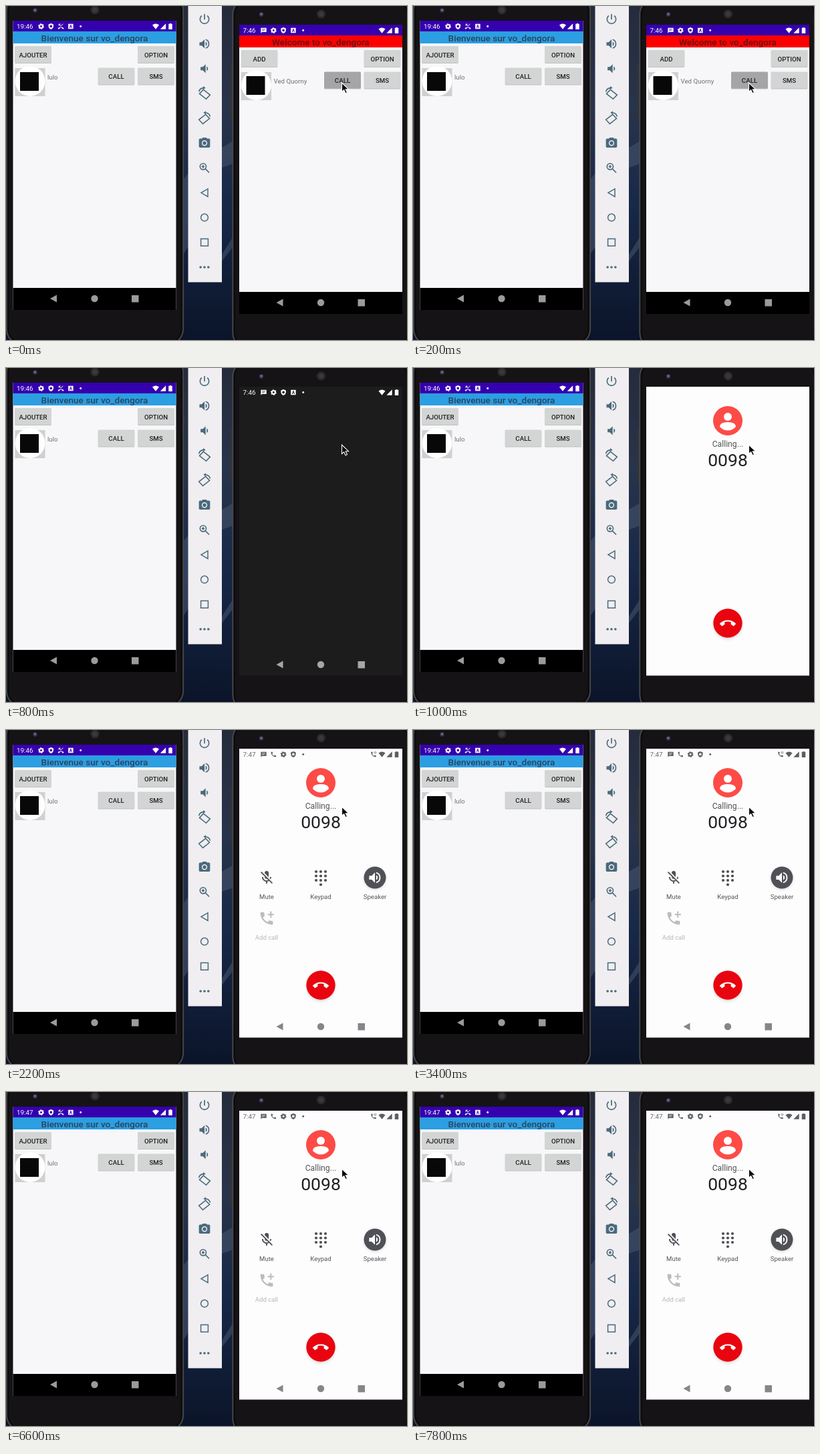
Animation of 600 by 500 pixels, one loop 8000 ms. Source, as an HTML page:

```html
<!DOCTYPE html>
<html lang="en">
<head>
<meta charset="utf-8">
<title>Two phones, one call</title>
<style>
  html, body { margin: 0; width: 100%; height: 100%; overflow: hidden; background: #10182a; }
  svg { display: block; width: 600px; height: 500px; font-family: Roboto, sans-serif; }
</style>
</head>
<body>
<svg id="stage" viewBox="0 0 600 500" xmlns="http://www.w3.org/2000/svg"></svg>
<script>
const LOOP = 8000;
const SLATE = '#4a6a7d';

// Icons live in a 24 x 24 box and take their colour from the parent.
const handset = '<path d="M6.6 10.8c1.4 2.8 3.8 5.1 6.6 6.6l2.2-2.2c.3-.3.7-.4 1-.2 1.1.4 2.3.6 3.6.6.6 0 1 .4 1 1V20c0 .6-.4 1-1 1C10.6 21 3 13.4 3 4c0-.6.4-1 1-1h3.5c.6 0 1 .4 1 1 0 1.2.2 2.4.6 3.6.1.3 0 .7-.3 1z"/>';
const stroke = (d, w = 2) => `<path d="${d}" fill="none" stroke="currentColor" stroke-width="${w}"/>`;
const turned = stroke('M10 5L22 14.5 15 22 3 12.500z', 1.9) +
  stroke('M2 9Q3 2.500 11 2', 1.9) + '<path d="M9.500-1v6l4.500-3z"/>';
const icons = {
  power: stroke('M12 3v10M17 6a8 8 0 1 1-10 0'),
  loud: '<path d="M3 9v6h4l5 5V4L7 9zM14 8v8a4.5 4.5 0 0 0 0-8z"/>' + stroke('M14 4.3a8 8 0 0 1 0 15.4'),
  soft: '<path d="M5 9v6h4l5 5V4L9 9zM16 8v8a4.5 4.5 0 0 0 0-8z"/>',
  turnLeft: turned,
  turnRight: `<g transform="matrix(-1 0 0 1 24 0)">${turned}</g>`,
  camera: '<path fill-rule="evenodd" d="M9 2L7.2 4H4a2 2 0 0 0-2 2v12a2 2 0 0 0 2 2h16a2 2 0 0 0 2-2V6a2 2 0 0 0-2-2h-3.2L15 2zM12 7a5 5 0 1 1 0 10 5 5 0 0 1 0-10z"/><circle cx="12" cy="12" r="3.2"/>',
  zoom: stroke('M9.5 4a5.5 5.5 0 1 1 0 11 5.5 5.5 0 0 1 0-11zM14 14l6.5 6.5M9.5 7v5M7 9.5h5'),
  back: stroke('M18 5v14L6 12z', 1.8),
  home: stroke('M12 5.5a6.5 6.5 0 1 1 0 13 6.5 6.5 0 0 1 0-13z', 1.8),
  recent: stroke('M5.5 5.5h13v13h-13z', 1.8),
  more: [5, 12, 19].map(x => `<circle cx="${x}" cy="12" r="2.2"/>`).join(''),
  gear: '<circle cx="12" cy="12" r="6" fill="none" stroke="currentColor" stroke-width="5"/><circle cx="12" cy="12" r="9" fill="none" stroke="currentColor" stroke-width="3" stroke-dasharray="4.71"/>',
  shield: '<path fill-rule="evenodd" d="M12 1L3 5v6c0 6 4 10 9 12 5-2 9-6 9-12V5zM12 7a4 4 0 1 1 0 9 4 4 0 0 1 0-9z"/>',
  missed: '<path d="M1 19c7-6 15-6 22 0l-3 3-4-2v-3q-4-1-8 0v3l-4 2z"/>' + stroke('M5 10V4h6M5 4l7 7 8-8', 2.4),
  letter: '<path fill-rule="evenodd" d="M3 3h18v18H3zM11 6L7 18h2l1-3h4l1 3h2L13 6zM12 9l1 4h-2z"/>',
  message: '<path fill-rule="evenodd" d="M2 3h20v15H6l-4 4zM6 7v2h12V7zM6 12v2h9v-2z"/>',
  dot: '<circle cx="12" cy="12" r="3.5"/>',
  wifi: '<path d="M0 7q12-9 24 0L12 22z"/>',
  signal: '<path d="M2 22h20V2z"/>',
  battery: '<path d="M6 4h4V2h4v2h4v18H6z"/>',
  handset,
  wifiCall: handset + stroke('M13 5q5-4 10 0M15 9q3-2 6 0', 2),
  addCall: handset + stroke('M18 2v9M13.5 6.5h9', 2),
  hangUp: '<path d="M12 9c-1.6 0-3.2.2-4.6.7v3.1c0 .4-.2.7-.6.9-1 .5-1.9 1.1-2.6 1.9-.4.4-1 .4-1.4 0L.3 13.1c-.4-.4-.4-1 0-1.4C3.3 8.8 7.5 7 12 7s8.7 1.8 11.7 4.7c.4.4.4 1 0 1.4l-2.5 2.5c-.4.4-1 .4-1.4 0-.8-.8-1.7-1.4-2.6-1.9-.4-.2-.6-.5-.6-.9V9.7C15.2 9.2 13.6 9 12 9z"/>',
  micOff: '<path d="M9 5.2V5a3 3 0 0 1 6 0v6.2zM9 10.3v.7a3 3 0 0 0 3.7 2.9z"/>' +
    stroke('M3.6 3.6l16.8 16.8', 1.8) + stroke('M5.9 11a6 6 0 0 0 9.5 5M18.1 11a6 6 0 0 1-.8 2.9M12 17v4', 1.8)
};

const icon = (name, x, y, size, color) =>
  `<g color="${color}" fill="${color}" transform="translate(${x - size / 2} ${y - size / 2}) scale(${size / 24})">${icons[name]}</g>`;
const rect = (x, y, w, h, fill, extra = '') => `<rect x="${x}" y="${y}" width="${w}" height="${h}" fill="${fill}" ${extra}/>`;
const circle = (x, y, r, fill, extra = '') => `<circle cx="${x}" cy="${y}" r="${r}" fill="${fill}" ${extra}/>`;
const text = (s, x, y, size, fill, extra = '') => `<text x="${x}" y="${y}" font-size="${size}" fill="${fill}" ${extra}>${s}</text>`;
const centered = (s, x, y, size, fill, weight = 400) =>
  text(s, x, y, size, fill, `text-anchor="middle" font-weight="${weight}"`);
const group = (id, content) => `<g id="${id}">${content}</g>`;
const band = (y, h, fill) => rect(10.5, y, 244, h, fill);

function phone() {
  return rect(.8, -18, 264.4, 526, '#151315', 'rx="25" stroke="#48494c" stroke-width="1.8"') +
    rect(3.5, -15, 259, 520, 'none', 'rx="22" stroke="#0d0c0d" stroke-width="2"') +
    circle(133, 6, 6.5, '#2c2b2d') + circle(133, 6, 3.5, '#3b393c') +
    circle(43.5, 6.5, 3.2, '#3a3650') + circle(43.5, 6, 1.5, '#7874a0');
}

function status(names, color, left, calling) {
  const right = [['wifi', 224, 10], ['signal', 235, 10], ['battery', 246, 11]];
  if (calling) right.unshift(['wifiCall', 211.5, 10]);
  return names.map((n, i) => icon(n, left + i * 14.8, 30.5, 10, color)).join('') +
    right.map(([n, x, s]) => icon(n, x, 30.5, s, color)).join('');
}

function nav(color) {
  return `<g fill="${color}"><path d="M76 432.5v11L66 438z"/><circle cx="132.5" cy="438" r="5.2"/><rect x="188" y="433" width="10.5" height="10.5"/></g>`;
}

const button = (label, x, y, fill = '#d3d4d4') =>
  rect(x, y, 55, 25.5, fill, 'rx="1.5"') +
  rect(x + .5, y + 25, 54, 1, '#c1c1c2') +
  centered(label, x + 27.5, y + 16.5, 9.7, '#202020', 500);

function contacts({ title, bar, ink, add, name, callFill }) {
  return band(22, 433, '#f7f6f9') + band(22, 16, '#3500ae') +
    band(38, 18, bar) + centered(title, 132.5, 52.5, 13.6, ink, 500) +
    button(add, 13, 60) + button('OPTION', 197, 60) +
    rect(13.5, 93, 45, 42, '#d0d0d0') + circle(36, 112.5, 22.5, '#fff') + rect(21, 99, 28, 28, '#080808') +
    text(name, 62, 110, 9.7, '#707070') +
    button('CALL', 137.5, 92.5, callFill) + button('SMS', 197, 92.5) +
    band(422, 33, '#000') + nav('#9b9b9b');
}

function dialer() {
  return rect(349, 28, 244, 432.5, '#fefdfe') +
    circle(471, 79, 22, '#fd4b46') + circle(471, 73, 6, '#fff') +
    '<path d="M459 88q0-7 12-7t12 7q-5 5.5-12 5.5T459 88z" fill="#fff"/>' +
    centered('Calling...', 471, 118, 12.2, '#505256') +
    centered('0098', 471, 147, 26.5, '#202124') +
    circle(471, 384.5, 21.5, '#0002', 'filter="url(#blur)"') +
    circle(471, 382, 21.7, '#e9050f') + icon('hangUp', 471, 382.5, 24, '#fff');
}

function controls() {
  let keys = '';
  for (let i = 0; i < 9; i++) keys += circle(464 + i % 3 * 7, 212 + Math.floor(i / 3) * 6.5, 2.1, '#4d5054');
  return icon('micOff', 390, 221, 24, '#4d5054') + keys + circle(471, 231.5, 2.1, '#4d5054') +
    circle(552, 222.5, 16.5, '#0002', 'filter="url(#blur)"') + circle(552, 221, 16.5, '#505157') + icon('loud', 552, 221, 23, '#fff') +
    icon('addCall', 390, 282, 25, '#bcbcbe') +
    [['Mute', 390], ['Keypad', 471], ['Speaker', 552]].map(([s, x]) => centered(s, x, 253, 9.6, '#55575a')).join('') +
    centered('Add call', 390, 314, 9.6, '#b5b5b7');
}

const shifted = content => `<g transform="translate(338.5 6)">${content}</g>`;
const tools = ['power', 'loud', 'soft', 'turnLeft', 'turnRight', 'camera', 'zoom', 'back', 'home', 'recent', 'more'];

document.getElementById('stage').innerHTML = `
  <defs>
    <linearGradient id="dusk" x2="0" y2="1">
      <stop offset="0" stop-color="#252b3b"/><stop offset=".3" stop-color="#28344b"/>
      <stop offset=".6" stop-color="#172848"/><stop offset="1" stop-color="#0b1429"/>
    </linearGradient>
    <filter id="blur" x="-50%" y="-50%" width="200%" height="200%"><feGaussianBlur stdDeviation="2"/></filter>
  </defs>` +
  rect(0, 0, 600, 500, 'url(#dusk)') +
  '<path d="M323 212L340 202V236L323 242zM323 372L340 345V360L323 382zM265 260L273 250V360L265 372z" fill="#4c5a73" opacity=".5"/>' +
  rect(265, 70, 2.5, 13, '#333438') + rect(336, 88, 3, 84, '#333438', 'rx="1"') +
  phone() + shifted(phone()) +
  rect(272.5, 0, 50.5, 413.5, '#f0eef0') +
  tools.map((n, i) => icon(n, 297, 19.5 + i * 37.15, 20, SLATE)).join('') +
  contacts({ title: 'Bienvenue sur vo_dengora', bar: '#2c9ee2', ink: '#29445c', add: 'AJOUTER', name: 'lulo' }) +
  text('19:46', 16, 34, 9.8, '#fff', 'id="clock"') +
  status(['gear', 'shield', 'missed', 'letter', 'dot'], '#fff', 52.5) +
  group('list', shifted(contacts({ title: 'Welcome to vo_dengora', bar: '#fe0000', ink: '#5d1212', add: 'ADD', name: 'Ved Quorny', callFill: '#a5a5a8' }))) +
  group('dark', rect(349, 28, 244, 432.5, '#1c1c1c') + shifted(nav('#a6a6a6'))) +
  group('idleBar', shifted(text('7:46', 16, 34, 9.8, '#fff') + status(['message', 'gear', 'shield', 'letter', 'dot'], '#fff', 47))) +
  group('call', dialer()) +
  group('controls', controls() + shifted(text('7:47', 16, 34, 9.8, '#66686b') +
    status(['message', 'handset', 'gear', 'shield', 'dot'], '#5c5e61', 47, true) + nav('#85868a'))) +
  '<path d="M502.5 115v13.5l3.2-2.8 2.4 5 2.400-1.100-2.300-4.900h4.300z" fill="#050505" stroke="#fff" stroke-width="1.1"/>';

const el = id => document.getElementById(id);
const show = (id, on) => { el(id).style.display = on ? '' : 'none'; };

function draw() {
  const t = performance.now() % LOOP;
  show('list', t < 400);
  show('dark', t >= 400 && t < 1000);
  show('idleBar', t < 1000);
  show('call', t >= 1000);
  show('controls', t >= 1200);
  el('clock').textContent = t < 2600 ? '19:46' : '19:47';
  requestAnimationFrame(draw);
}
draw();
</script>
</body>
</html>
```
